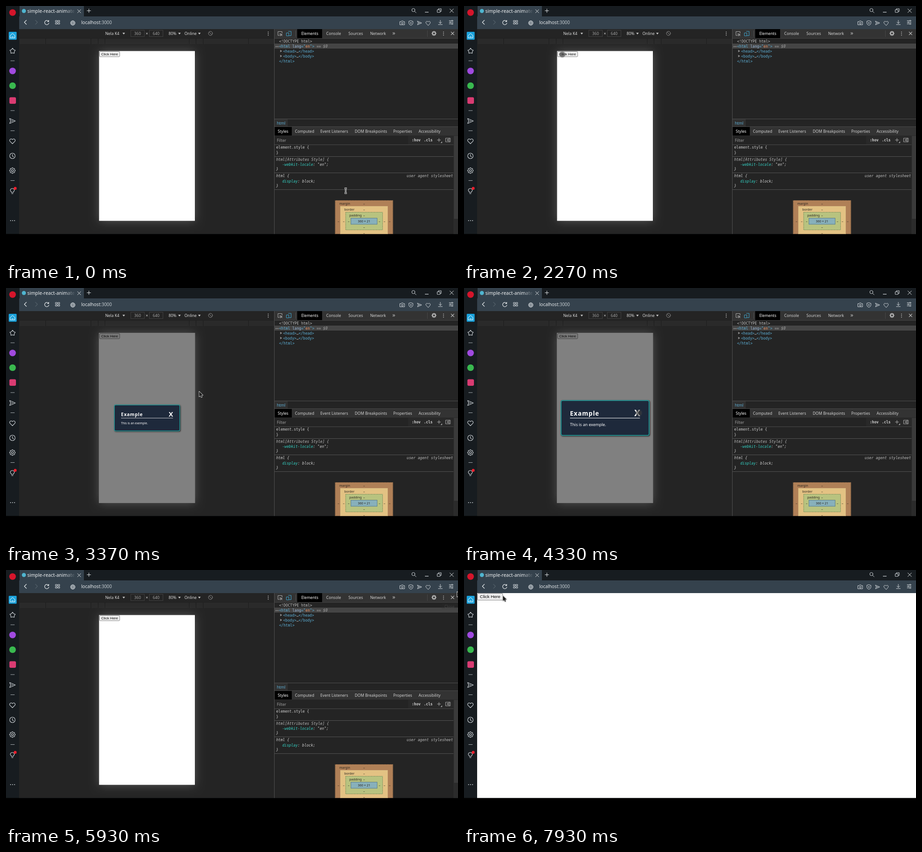
An HTML page with a canvas that plays this animation: 998x561 px, repeating every 8 s.

```html
<!DOCTYPE html>
<html lang="en">
<head>
<meta charset="utf-8">
<title>Modal demo</title>
<style>
html, body { margin: 0; width: 100%; height: 100%; overflow: hidden; background: #000; }
canvas { display: block; width: 998px; height: 561px; }
</style>
</head>
<body>
<canvas id="stage" width="998" height="561"></canvas>
<script>
const ctx = document.getElementById('stage').getContext('2d');
const LOOP = 8000, OPEN = 3100, GROW = 406, SHUT = 4500, GONE = 4850, CLOSED = 6400;
const SANS = '"Noto Sans", "Open Sans", sans-serif';
const MONO = '"DejaVu Sans Mono", monospace';
const ARIAL = '"Liberation Sans", Arial, sans-serif';

// pointer path: time, x, y
const KEYS = [
  [0, 750, 408], [1250, 750, 408], [1600, 560, 285], [2000, 217, 107], [3000, 217, 107],
  [3340, 426.5, 228.5], [3550, 426.5, 228.5], [4150, 386, 276], [4950, 386, 276], [5450, 720, 140],
  [5850, 994, 50], [5930, 996, 48], [6150, 986, 58], [6450, 986, 58], [6720, 978, 77],
  [6850, 978, 77], [7540, 100, 60], [7850, 86, 57], [8000, 86, 57]
];

const PATHS = {
  cross: 'M-3.5-3.5L3.5 3.5M3.5-3.5L-3.5 3.5',
  plus: 'M-4 0H4M0-4V4',
  back: 'M2-4.5L-2.5 0L2 4.5',
  forward: 'M-2-4.5L2.5 0L-2 4.5',
  reload: 'M3.6-3A4.7 4.7 0 1 0 4.7 1M4.4-5V-2H1.2',
  grid: 'M-4.5-4h3.5v3h-3.5zM1-4h3.5v3H1zM-4.5 1h3.5v3h-3.5zM1 1h3.5v3H1z',
  globe: 'M-5 0A5 5 0 1 0 5 0A5 5 0 1 0-5 0H5M0-5C-3-2-3 2 0 5C3 2 3-2 0-5M-4-2.5H4M-4 2.5H4',
  search: 'M2.5-1A3.5 3.5 0 1 1-4.5-1A3.5 3.5 0 1 1 2.5-1M1.5 1.5L5 5',
  restore: 'M-4-1.5H2V4H-4zM-2-1.5V-4H4.5V2H2',
  camera: 'M-5-3H-2.5L-1.5-4.5H1.5L2.5-3H5V4H-5zM2 .5A2 2 0 1 1-2 .5A2 2 0 1 1 2 .5',
  shield: 'M0-5L4.5-3.5V0C4.5 3 2 4.3 0 5C-2 4.3-4.5 3-4.5 0V-3.5zM-1.7-1.7L1.7 1.7M1.7-1.7L-1.7 1.7',
  send: 'M-5-4.5L5.5 0L-5 4.5L-3 0zM-3 0H1',
  heart: 'M0 4.8L-4.3.5C-6.5-2-3-6.5 0-2.8C3-6.5 6.5-2 4.3.5z',
  download: 'M0-5V2M-3-1L0 2L3-1M-4.5 4.5H4.5',
  sliders: 'M-4.5-3.5H4.5M-4.5 0H4.5M-4.5 3.5H4.5M2-5V-2M-2-1.5V1.5M2 2V5',
  house: 'M-5-.5L0-5L5-.5V5H-5zM-2 2.5H2',
  star: 'M0-5.8L2.4-2.6L6-1.3L3.9 1.6L3.7 5.4L0 4.5L-3.7 5.4L-3.9 1.6L-6-1.3L-2.4-2.6z',
  clock: 'M6 0A6 6 0 1 1-6 0A6 6 0 1 1 6 0M0-3.5V.5L2.5 2',
  bulb: 'M-2 3.5V2C-7-1.5-3.5-5.5 0-5.5C3.5-5.5 7-1.5 2 2V3.5zM-1.5 6H1.5',
  inspect: 'M4.5-1V-4.5H-4.5V4H-1M0 0L5 2L2.5 2.8L1.5 5zM2 2L5 5',
  device: 'M-1-5H5V4.5H1M-5-1.5H0V5H-5z',
  blocked: 'M4.5 0A4.5 4.5 0 1 1-4.5 0A4.5 4.5 0 1 1 4.5 0M-3-3L3 3',
  panel: 'M-5-4H5V4H-5zM2.5-4V4M0-2L-2.5 0L0 2z'
};

function rect(x, y, w, h, color) {
  ctx.fillStyle = color;
  ctx.fillRect(x, y, w, h);
}
function frame(x, y, w, h, color, dash = []) {
  ctx.strokeStyle = color;
  ctx.lineWidth = 1;
  ctx.setLineDash(dash);
  ctx.strokeRect(x + .5, y + .5, w - 1, h - 1);
  ctx.setLineDash([]);
}
function dot(x, y, r, color) {
  ctx.fillStyle = color;
  ctx.beginPath();
  ctx.arc(x, y, r, 0, 7);
  ctx.fill();
}
function rounded(x, y, w, h, r, fill, stroke, width = 1) {
  ctx.beginPath();
  ctx.roundRect(x, y, w, h, r);
  ctx.fillStyle = fill;
  ctx.fill();
  if (!stroke) return;
  ctx.strokeStyle = stroke;
  ctx.lineWidth = width;
  ctx.stroke();
}
function text(s, x, y, color, size = 8.7, font = SANS, style = '', align = 'left') {
  ctx.font = `${style} ${size}px ${font}`;
  ctx.textAlign = align;
  ctx.fillStyle = color;
  ctx.fillText(s, x, y);
}
function code(x, y, parts, style = '') {
  for (const [s, color, own] of parts) {
    text(s, x, y, color, 8.08, MONO, own || style);
    x += ctx.measureText(s).width;
  }
}
function icon(name, x, y, color = '#d3d8dc', scale = 1, width = 1) {
  ctx.save();
  ctx.translate(x, y);
  ctx.scale(scale, scale);
  ctx.strokeStyle = color;
  ctx.lineWidth = width / scale;
  ctx.lineJoin = ctx.lineCap = 'round';
  ctx.stroke(new Path2D(PATHS[name]));
  ctx.restore();
}
function gear(x, y, r, color, solid) {
  ctx.beginPath();
  for (let i = 0; i < 48; i++) {
    const a = i / 48 * Math.PI * 2, d = r * (.88 + .12 * Math.cos(a * 8));
    ctx.lineTo(x + d * Math.cos(a), y + d * Math.sin(a));
  }
  ctx.closePath();
  ctx.moveTo(x + r * .36, y);
  ctx.arc(x, y, r * .36, 0, 7);
  ctx.fillStyle = ctx.strokeStyle = color;
  ctx.lineWidth = 1.1;
  if (solid) ctx.fill('evenodd');
  else ctx.stroke();
}
function triangle(x, y, color = '#c4c4c4') {
  ctx.fillStyle = color;
  ctx.fill(new Path2D(`M${x - 2.8} ${y - 1.6}h5.6l-2.8 4z`));
}
function dots(x, y, dx, dy, color) {
  for (let i = -1; i <= 1; i++) dot(x + i * dx, y + i * dy, 1, color);
}

function drawBrowser() {
  rect(0, 0, 998, 561, '#000');
  rect(0, 0, 998, 503.5, '#171c20');
  rect(30, 0, 142, 23, '#35424d');
  rect(29, 23, 969, 28, '#35424d');

  dot(39.5, 11, 4.5, '#4fb5d0');
  const fade = ctx.createLinearGradient(130, 0, 153, 0);
  fade.addColorStop(0, '#f0f2f3');
  fade.addColorStop(1, '#35424d');
  text('simple-react-animate', 47, 15, fade, 10.5);
  icon('cross', 161.5, 11.5, '#e6e9eb');
  icon('plus', 183, 10.5, '#e6e9eb');
  icon('search', 900.5, 10);
  rect(925, 13, 8, 1.2, '#d3d8dc');
  icon('restore', 956.5, 10);
  icon('cross', 984, 10.5, '#e6e9eb', 1.15);

  icon('back', 43, 36, '#e6e9eb', 1, 1.2);
  icon('forward', 67, 36, '#69757e');
  icon('reload', 90, 36.5, '#e6e9eb', 1, 1.2);
  icon('grid', 114, 36);
  icon('globe', 147.5, 37.5);
  text('localhost', 166, 40, '#e9ecee', 10);
  text(':3000', 166 + ctx.measureText('localhost').width, 40, '#c1c8cd', 10);
  icon('camera', 875, 37.5);
  icon('shield', 894, 37.5);
  icon('send', 913, 37.5, '#d3d8dc', .9);
  icon('heart', 932, 38);
  icon('download', 959, 36.5);
  icon('sliders', 983, 36);

  dot(14.5, 14.5, 7.3, '#d5152b');
  rounded(6, 57, 17.5, 17.5, 1.5, '#1aa2dc');
  icon('house', 14.5, 65.5, '#fff');
  icon('star', 14.5, 99, '#d3d8dc', 1, 1.1);
  for (const y of [121, 231, 275.5, 385.5]) rect(10, y - .5, 9, 1, '#aab0b4');
  dot(14.5, 143.5, 7.3, '#a04ae0');
  dot(14.5, 176, 7.3, '#39b94f');
  rounded(7.5, 201.5, 14.5, 14.5, 3, '#d93b72');
  icon('send', 14, 254, '#d3d8dc', 1.2, 1.1);
  icon('heart', 14.2, 298.5, '#d3d8dc', 1.2, 1.1);
  icon('clock', 14.2, 331, '#d3d8dc', 1, 1.1);
  gear(14.2, 363.5, 6.4, '#d3d8dc');
  icon('bulb', 14, 408.5, '#d3d8dc', 1, 1.1);
  dot(20.3, 402.8, 3.2, '#ee1f2d');
  dots(14.5, 474, 4.4, 0, '#d3d8dc');
}

function drawButton(x, y, w, h, size) {
  rounded(x, y, w, h, 1.5, '#efefef', '#767676', .9);
  text('Click Here', x + w / 2, y + h / 2 + size * .34, '#000', size, ARIAL, '', 'center');
}

function drawDeviceBar() {
  rect(29, 51, 564, 452.5, '#242424');
  rect(29, 71, 564, 1, '#202020');
  rect(30, 72, 562, 12, '#2a2a2a');
  for (const x of [87, 187, 203, 218, 404, 419, 435, 535]) rect(x, 72, 1, 12, '#1d1d1d');
  const light = '#dadada';
  text('Nela K4', 219, 64, light);
  triangle(260, 60.5);
  for (const [x, s] of [[275, '360'], [316, '640']]) {
    frame(x, 53, 31, 15, '#404040');
    text(s, x + 15.5, 64, '#a2a2a2', 8.7, SANS, '', 'center');
  }
  text('×', 311, 64, light, 9, SANS, '', 'center');
  text('80%', 359, 64, light);
  triangle(383, 60.5);
  text('Online', 394, 64, light);
  triangle(427, 60.5);
  icon('blocked', 451.5, 60.5, '#929292');
  dots(579, 61, 0, 3.5, '#b0b0b0');
}

function drawTools() {
  rect(593, 51, 405, 452.5, '#242424');
  rect(592, 51, 1, 452.5, '#505050');
  rect(593, 51, 405, 20, '#333');
  rect(593, 71, 405, 1, '#444');
  icon('inspect', 605, 61, '#acacac');
  icon('device', 624.5, 61, '#3fa5cd');
  rect(639, 54, 1, 14, '#505050');
  rect(643, 51, 55, 20, '#000');
  [['Elements', 652, '#fff'], ['Console', 707], ['Sources', 756], ['Network', 804]]
    .forEach(([s, x, c = '#d2d2d2']) => text(s, x, 64, c));
  text('»', 853, 64, '#c2c2c2', 13);
  rect(930, 54, 1, 14, '#484848');
  gear(945, 60.5, 5.6, '#adadad', true);
  dots(966, 61, 0, 3.5, '#adadad');
  icon('cross', 986, 60.5, '#c4c4c4', .9, 1.2);

  const tag = '#5db0d7', grey = '#a6a6a6';
  rect(593, 83, 405, 11, '#454545');
  code(603, 81, [['<!DOCTYPE html>', '#c4c4c4']]);
  dots(598.5, 89.5, 2.6, 0, '#999');
  code(603, 92, [['<html ', tag], ['lang', '#9bbbdc'], ['="', tag], ['en', '#f29766'], ['">', tag],
    [' == $0', grey, 'italic']]);
  ['head', 'body'].forEach((s, i) => {
    const y = 102.5 + i * 11;
    ctx.fillStyle = '#929292';
    ctx.fill(new Path2D(`M605.5 ${y - 5.8}v5.6l4-2.8z`));
    code(612, y, [[`<${s}>`, tag], ['…', '#ccc'], [`</${s}>`, tag]]);
  });
  code(603, 124.5, [['</html>', tag]]);

  rect(593, 249, 405, 1, '#505050');
  rect(593, 250, 29, 16, '#303030');
  text('html', 598, 261.5, tag);
  rect(593, 266, 405, 20, '#333');
  rect(593, 266, 405, 1, '#484848');
  rect(593, 267, 38, 19, '#000');
  [['Styles', 600, '#fff'], ['Computed', 638], ['Event Listeners', 694], ['DOM Breakpoints', 770],
    ['Properties', 855], ['Accessibility', 911]]
    .forEach(([s, x, c = '#d2d2d2']) => text(s, x, 279.5, c, 8.6));

  rect(593, 286, 395, 20, '#292929');
  rect(593, 287, 295, 18, '#242424');
  text('Filter', 598, 299.5, '#a0a0a0');
  code(896, 299, [[':hov', '#d2d2d2']], 'bold');
  code(922.5, 299, [['.cls', '#d2d2d2']], 'bold');
  icon('plus', 956, 296, '#b0b0b0', .9);
  ctx.fillStyle = '#b0b0b0';
  ctx.fill(new Path2D('M963 299v3.5h-3.5z'));
  icon('panel', 976, 296, '#acacac');
  rect(593, 306, 395, 1, '#484848');
  for (const y of [332, 368, 405]) rect(593, y, 395, 1, '#545454');

  const plain = '#d2d2d2', prop = '#35d4c7';
  code(596.5, 315, [['element.style {', plain]]);
  code(596.5, 327, [['}', plain]]);
  code(596.5, 341.5, [['html[Attributes Style] {', '#bebebe']], 'italic');
  code(610, 353, [['-webkit-locale', prop], [': "en";', plain]], 'italic');
  code(596.5, 363, [['}', plain]], 'italic');
  code(596.5, 378, [['html {', plain]], 'italic');
  text('user agent stylesheet', 987, 378, '#bebebe', 8.08, MONO, 'italic', 'right');
  code(610, 389.5, [['display', prop], [': block;', plain]], 'italic');
  code(596.5, 399.5, [['}', plain]], 'italic');
  rect(988, 286, 10, 217.5, '#2b2b2b');
  rect(989, 287, 9, 183, '#3a3a3a');
  drawBoxModel();
}

function drawBoxModel() {
  const ink = '#2b2620';
  ctx.save();
  ctx.beginPath();
  ctx.rect(593, 406, 395, 97.5);
  ctx.clip();
  rect(726.5, 429, 128, 92, '#b08057');
  frame(726.5, 429, 128, 92, '#6b5038', [2, 1.5]);
  rect(738, 442, 105, 66, '#e3c283');
  frame(738, 442, 105, 66, '#d8bb84');
  rect(749.5, 455, 82.5, 40, '#b8c37f');
  frame(749.5, 455, 82.5, 40, '#727c52', [2, 1.5]);
  rect(761, 468, 59, 14.5, '#87b0bb');
  frame(761, 468, 59, 14.5, '#5f7e88');
  text('margin', 736, 438.5, ink, 7);
  text('border', 747, 451.5, ink, 7);
  text('padding', 758, 464.5, ink, 7);
  text('360 × 21', 790.5, 478, ink, 7, SANS, '', 'center');
  for (const y of [438.5, 451.5, 464.5, 491, 504]) text('–', 790.5, y, ink, 7.5, SANS, '', 'center');
  for (const x of [734, 745.5, 756.5, 824.5, 835.5, 847]) text('–', x, 478, ink, 7.5, SANS, '', 'center');
  ctx.restore();
}

const clamp = v => Math.max(0, Math.min(1, v));
const smooth = v => v * v * (3 - 2 * v);

function drawPhone(t) {
  const open = t >= OPEN && t < GONE;
  ctx.save();
  ctx.shadowColor = 'rgba(255,255,255,.24)';
  ctx.shadowBlur = 21;
  rect(205.5, 99.5, 211.5, 375, '#fff');
  ctx.restore();
  drawButton(206.5, 100.5, 44.5, 11.5, 8);
  if (!open) return;
  // the backdrop tints only the page, not the glow around it
  ctx.save();
  ctx.globalCompositeOperation = 'multiply';
  rect(206, 100, 211, 374, '#808080');
  ctx.restore();
  frame(205, 99, 212.5, 376, '#7c7c7c');
  const scale = t < SHUT ? smooth(clamp((t - OPEN) / GROW)) : 1 - smooth(clamp((t - SHUT) / (GONE - SHUT)));
  if (scale > .01) drawModal(scale);
}

function drawModal(scale) {
  ctx.save();
  ctx.translate(311.5, 287);
  ctx.scale(scale, scale);
  ctx.shadowColor = 'rgba(0,0,0,.75)';
  ctx.shadowBlur = 3;
  ctx.shadowOffsetX = ctx.shadowOffsetY = 1.2;
  rounded(-98, -39.3, 196, 78.6, 4, '#1e293b');
  ctx.shadowColor = 'transparent';
  rounded(-97.2, -38.5, 194.4, 77, 3.5, '#1e293b', '#20aaa6', 1.6);
  ctx.letterSpacing = '1px';
  text('Example', -77.5, -5, '#fff', 13.6, SANS, 'bold');
  ctx.letterSpacing = '0px';
  text('X', 77.5, -4, '#fff', 19.5, SANS, 'bold', 'right');
  rect(-77.5, -.2, 154.5, 1, '#fff');
  text('This is an exemple.', -77.5, 18.3, '#fff', 9);
  ctx.restore();
}

function pointerAt(t) {
  const i = Math.max(1, KEYS.findIndex(k => k[0] > t));
  const [t0, x0, y0] = KEYS[i - 1], [t1, x1, y1] = KEYS[i];
  const p = smooth(clamp((t - t0) / (t1 - t0)));
  return [x0 + (x1 - x0) * p, y0 + (y1 - y0) * p];
}

function drawPointer(t) {
  const [x, y] = pointerAt(t), tools = t < CLOSED;
  if (tools && x > 206 && x < 417 && y > 100 && y < 474) {
    const glow = ctx.createRadialGradient(x, y, 0, x, y, 8);
    glow.addColorStop(0, 'rgba(50,50,50,.72)');
    glow.addColorStop(.65, 'rgba(60,60,60,.6)');
    glow.addColorStop(1, 'rgba(80,80,80,0)');
    dot(x, y, 8, glow);
    return;
  }
  ctx.save();
  ctx.translate(x, y);
  ctx.lineJoin = 'round';
  if (tools && x > 593 && y > 306) {
    const beam = new Path2D('M-2.5-5.5H2.5M-2.5 5.5H2.5M0-5.5V5.5');
    for (const [c, w] of [['#fff', 3], ['#000', 1]]) {
      ctx.strokeStyle = c;
      ctx.lineWidth = w;
      ctx.stroke(beam);
    }
  } else {
    const arrow = new Path2D('M0 0V11.5L2.7 9L4.5 13L6.3 12.2L4.6 8.3H8.2z');
    ctx.shadowColor = 'rgba(0,0,0,.4)';
    ctx.shadowBlur = 2;
    ctx.strokeStyle = '#fff';
    ctx.lineWidth = 1.6;
    ctx.stroke(arrow);
    ctx.fillStyle = '#202020';
    ctx.fill(arrow);
  }
  ctx.restore();
}

function draw(now) {
  const t = now % LOOP;
  drawBrowser();
  if (t < CLOSED) {
    drawDeviceBar();
    drawTools();
    drawPhone(t);
    ctx.globalAlpha = clamp((t - 5910) / 130);
    rect(962, 74, 34, 13, '#303030');
    text('Close', 968, 83.5, '#ccc');
    ctx.globalAlpha = 1;
  } else {
    rect(29, 51, 969, 452.5, '#fff');
    drawButton(29.8, 51.8, 55.7, 14.7, 9.8);
  }
  drawPointer(t);
}

function tick() {
  draw(performance.now());
  requestAnimationFrame(tick);
}
tick();
</script>
</body>
</html>
```
